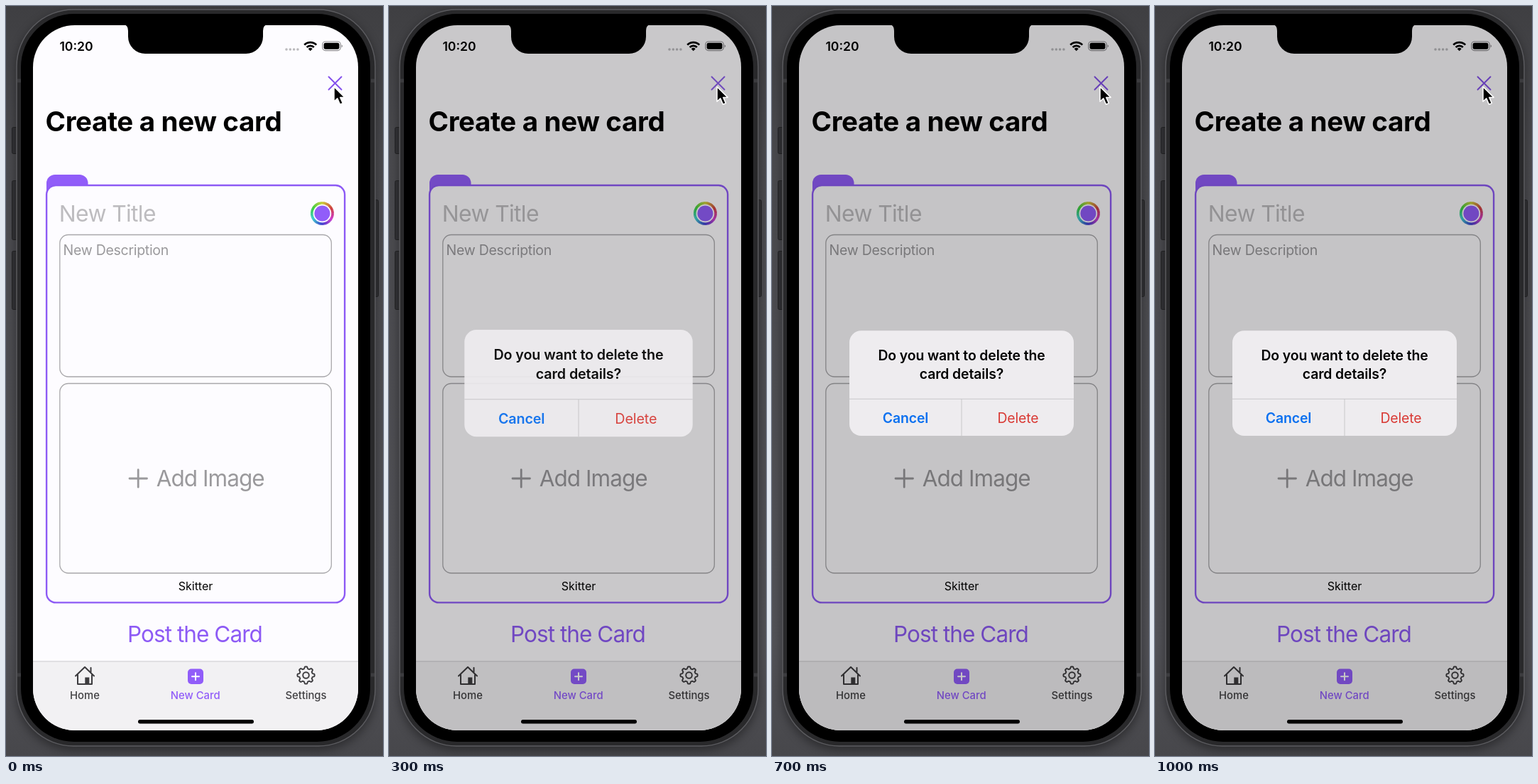
Animation, 531 px wide and 1054 px high, one loop 1100 ms. Source, as an HTML page:

```html
<!DOCTYPE html>
<html lang="en">
<head>
<meta charset="utf-8">
<title>Create a new card</title>
<style>
  html, body { margin: 0; width: 100%; height: 100%; overflow: hidden; background: #48484c; }
  svg { display: block; width: 100%; height: 100%; font-family: Inter, "Liberation Sans", sans-serif; }
  .mid { text-anchor: middle; }
  .line { fill: none; stroke-linecap: round; stroke-linejoin: round; }
  .large { font-size: 31.5px; letter-spacing: -.03em; }
  .tabs { font-size: 14.8px; font-weight: 500; fill: #414043; }
  .alert { font-size: 19.4px; font-weight: 600; letter-spacing: -.006em; }
  .body { filter: drop-shadow(0 5px 7px #0006); }
</style>
</head>
<body>
<svg viewBox="0 0 531 1054">
  <defs>
    <linearGradient id="backdrop" x2="0" y2="1">
      <stop stop-color="#3f3f42"/>
      <stop offset=".2" stop-color="#4a4a4e"/>
      <stop offset=".85" stop-color="#525257"/>
      <stop offset="1" stop-color="#47474b"/>
    </linearGradient>
    <clipPath id="screen"><rect x="38" y="27" width="458" height="991" rx="59"/></clipPath>
  </defs>

  <rect width="531" height="1054" fill="url(#backdrop)"/>

  <!-- Phone body -->
  <g fill="#343437" stroke="#242426">
    <rect x="8.5" y="170.5" width="9" height="37" rx="2"/>
    <rect x="8.5" y="245.5" width="9" height="83" rx="2"/>
    <rect x="8.5" y="344.5" width="9" height="82" rx="2"/>
    <rect x="515" y="272.5" width="9.5" height="136" rx="2"/>
  </g>
  <rect class="body" x="15" y="5" width="505" height="1035" rx="80" fill="#29292b" stroke="#5b5b5f" stroke-width="1.5"/>
  <path d="M16 105h5M514 105h5M16 940h5M514 940h5" stroke="#3c3c3f" stroke-width="5"/>
  <rect x="21" y="11" width="492" height="1023" rx="75"/>

  <g clip-path="url(#screen)">
    <rect x="38" y="27" width="458" height="991" fill="#fdfcff"/>

    <!-- Status bar -->
    <text class="mid" x="99" y="63" font-size="17.6" font-weight="600">10:20</text>
    <path class="line" d="M395 61h.01M400.3 61h.01M405.6 61h.01M410.9 61h.01" stroke="#bbbabd" stroke-width="3.6"/>
    <path d="M420.2 54.6a12 12 0 0 1 17 0M423.6 58a7.2 7.2 0 0 1 10.2 0" fill="none" stroke="#000" stroke-width="2.7"/>
    <path d="M428.7 63.2l-3-3a4.3 4.3 0 0 1 6 0z"/>
    <rect x="445.8" y="50" width="25.4" height="12.6" rx="4" fill="none" stroke="#8e8d90" stroke-width="1.2"/>
    <rect x="447.6" y="51.8" width="21.8" height="9" rx="2.4"/>
    <path d="M472.6 54.2q3 2 0 4.2z" fill="#8e8d90"/>

    <path id="close" class="line" d="M454.5 99.5l18 18M472.5 99.5l-18 18" stroke="#8451ec" stroke-width="1.9"/>
    <text x="55.5" y="176.4" font-size="38.5" font-weight="700" letter-spacing="-.009em">Create a new card</text>

    <!-- Card -->
    <rect x="57" y="237" width="58.5" height="40" rx="12" fill="#915df9"/>
    <rect x="57.1" y="252" width="420" height="586.4" rx="13" fill="#fdfcff" stroke="#8d5af5" stroke-width="2.4"/>
    <text x="74.8" y="303" font-size="31.8" letter-spacing="-.02em" fill="#bdbcbf">New Title</text>
    <g id="ring" fill="none" stroke-width="3.6"></g>
    <circle cx="445.4" cy="291.5" r="11" fill="#915df9"/>
    <g fill="none" stroke="#a9a8ab" stroke-width="1.3">
      <rect x="75.8" y="321.5" width="382.5" height="199.5" rx="12"/>
      <rect x="75.8" y="530.5" width="382.5" height="266.5" rx="12"/>
    </g>
    <g fill="#9a999c">
      <text x="80.6" y="350" font-size="19.5" letter-spacing="-.014em">New Description</text>
      <text class="large" x="211.7" y="675">Add Image</text>
    </g>
    <path class="line" d="M174 664h24.5M186.2 651.7v24.5" stroke="#9a999c" stroke-width="2.8"/>
    <text class="mid" x="267" y="821" font-size="16">Skitter</text>
    <text class="mid large" x="266" y="894" fill="#8d5af5">Post the Card</text>

    <!-- Tab bar -->
    <rect x="38" y="921" width="458" height="97" fill="#f2f1f3"/>
    <path d="M38 921h458" stroke="#cbcacd"/>
    <g class="line" stroke="#3c3b3e" stroke-width="2">
      <path d="M98 941.5L111 929l13 12.5M101 940v13h20v-13M119.5 936v-6"/>
      <path id="gear" stroke-width="1.9"/>
      <circle cx="422.5" cy="940.5" r="4.3" stroke-width="1.9"/>
    </g>
    <path d="M111.3 953v-9.5h6v9.5z" fill="#3c3b3e"/>
    <rect x="256" y="931.5" width="22" height="21.5" rx="5" fill="#915df9"/>
    <path class="line" d="M262 942.2h10M267 937.2v10" stroke="#fff" stroke-width="2"/>
    <g class="tabs mid">
      <text x="111" y="974">Home</text>
      <text x="266.7" y="974" fill="#915df9">New Card</text>
      <text x="422.5" y="974">Settings</text>
    </g>

    <rect id="dim" x="38" y="27" width="458" height="991" opacity="0"/>
    <rect x="186" y="1003" width="163" height="5.4" rx="2.7"/>
  </g>

  <path d="M166 26q6 1 6 9v8a24 24 0 0 0 24 24h142a24 24 0 0 0 24-24v-8q0-8 6-9z"/>

  <g id="alert" class="alert mid" opacity="0">
    <rect x="109" y="456.3" width="316" height="147.7" rx="16.5" fill="#eeecef"/>
    <path d="M109 552.3h316M267 552.3V604" stroke="#c8c7ca"/>
    <text x="267" y="498">Do you want to delete the</text>
    <text x="267" y="524">card details?</text>
    <text x="188" y="586" fill="#0a70f0">Cancel</text>
    <text x="346.5" y="586" fill="#d93a35" font-weight="400">Delete</text>
  </g>

  <path d="M462 113.5v20.8l4.8-4.4 3.6 8.4 4-1.7-3.7-8.2h6.4z" stroke="#fff" stroke-width="1.5" stroke-linejoin="round"/>
</svg>
<script>
  const $ = id => document.getElementById(id);
  const polar = (cx, cy, r, a) => `${(cx + r * Math.cos(a)).toFixed(2)} ${(cy - r * Math.sin(a)).toFixed(2)}`;
  const TAU = 2 * Math.PI;

  // Hue wheel around the colour picker, counter-clockwise, orange at the upper right
  const SEGMENTS = 48;
  $('ring').innerHTML = Array.from({ length: SEGMENTS }, (_, i) => {
    const from = i / SEGMENTS * TAU, to = (i + 1.2) / SEGMENTS * TAU;
    return `<path d="M${polar(445.4, 291.5, 14.7, from)}L${polar(445.4, 291.5, 14.7, to)}"
      stroke="hsl(${i / SEGMENTS * 360 - 25} 60% 52%)"/>`;
  }).join('');

  // Gear outline with eight soft teeth
  $('gear').setAttribute('d', 'M' + Array.from({ length: 96 }, (_, i) => {
    const a = i / 96 * TAU;
    const tooth = Math.max(-1, Math.min(1, 1.7 * Math.cos(8 * a)));
    return polar(422.5, 940.5, 10.7 + 1.4 * tooth, a);
  }).join('L') + 'Z');

  const LOOP = 1100, TAP = 200, STEP = 100;

  function draw(now) {
    const t = now % LOOP;
    const open = t >= TAP;
    // Distance left to the settled pose, held for each step
    const rest = open ? .46 * .17 ** Math.floor((t - TAP) / STEP) : 0;
    const shown = open ? 1 - rest : 0;
    $('dim').setAttribute('opacity', .225 * shown);
    $('close').setAttribute('opacity', 1 - rest);
    $('alert').setAttribute('opacity', shown);
    $('alert').setAttribute('transform',
      `translate(267 530.2) scale(${1 + .22 * rest}) translate(-267 -530.2)`);
  }

  const start = performance.now();
  (function tick() {
    draw(performance.now() - start);
    requestAnimationFrame(tick);
  })();
</script>
</body>
</html>
```
